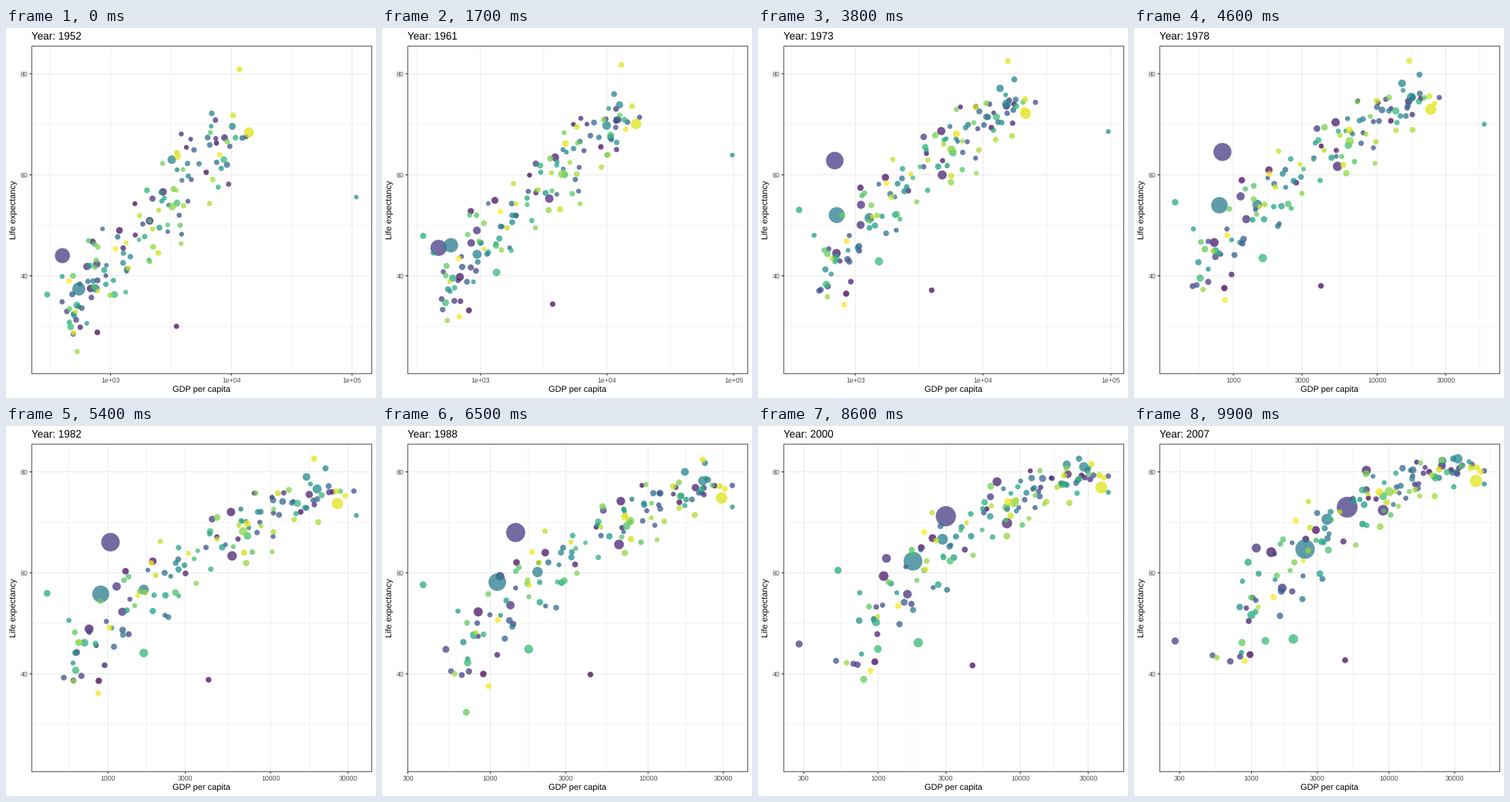
A matplotlib script for the animation above (10000 ms loop, 480 px wide and 480 px high).

```python
import numpy as np
import matplotlib.pyplot as plt
from matplotlib.animation import FuncAnimation
from matplotlib.collections import LineCollection
from matplotlib.patches import Rectangle

plt.rcParams["font.family"] = "Liberation Sans"
plt.rcParams["text.hinting"] = "none"

FRAMES, COUNT = 100, 142
LEFT, RIGHT, TOP, BOTTOM = 33.3, 474.5, 23.1, 448.2
STEPS = np.arange(12)            # one step every five years, 1952 to 2007
PART = STEPS / 11

# large or unusual countries: rank, population in millions, GDP and life
# expectancy, each as first, last (and how the path between them bends)
LEADS = [
    (24, 556, 1319, 400, 4959, 1.6, 44, 73, 0.45),
    (58, 372, 1110, 547, 2452, 1.8, 37.4, 64.7, 0.65),
    (134, 157, 301, 13990, 42952, 1, 68.4, 78.2, 1),
    (66, 86, 127, 3217, 31656, 0.4, 63, 82.6, 0.6),
    (59, 82, 223, 750, 3541, 1.1, 37.5, 70.6, 0.9),
    (14, 57, 190, 2109, 9066, 0.6, 50.9, 72.4, 0.9),
    (8, 47, 150, 684, 1391, 3, 37.5, 64.1, 1.4),
    (94, 33, 135, 1077, 2014, 0.6, 36.3, 46.9, 0.5),
    (3, 4, 12, 3520, 4797, 1, 30, 42.7, 0.6),
    (0, 8, 32, 779, 975, 1, 28.8, 43.8, 0.7),
]
GIANT, RICHEST, POOR_A, POOR_B, CRISIS = 24, 71, 87, 27, 107


def bend(a, b, power):
    return a + (b - a) * PART ** power


def path(steps, values):
    return np.interp(STEPS, steps, values)


def radius(pop):
    size = 2 + 10 * np.sqrt(np.clip((pop - 0.06) / 1318.6, 0, 1))
    return 0.375 * (size * 2.845 + 0.945) + 0.35


def crowd(rng):
    """Countries spread evenly over wealth u, with life following wealth."""
    u = rng.permutation(np.linspace(0, 1, COUNT))[:, None]

    def noise(sd):
        return sd * rng.normal(size=(COUNT, 1)).clip(-2, 2)

    sway = np.sin(np.pi * PART)
    x = bend(2.58 + 1.45 * u + noise(0.08),
             2.72 + 1.9 * u ** 0.8 + noise(0.09), 0.75)
    x += noise(0.07) * sway + rng.normal(0, 0.02, x.shape)
    lean = noise(1)
    y = bend(34 + 35 * u ** 1.15 + 4 * lean + noise(2.5),
             80 - 33 * (1 - u) ** 2.2 + (1.2 + 4 * (1 - u)) * (0.7 * lean + noise(0.7)),
             0.7)
    y += noise(1) * sway
    pop = np.exp(rng.normal(1.6, 1.15, (COUNT, 1))).clip(0.1, 50)
    return x, y, radius(pop * bend(1, 2.2, 1))


def build():
    """Log GDP, life expectancy and dot radius, each as (country, step)."""
    x, y, r = crowd(np.random.default_rng(52))
    for i, p0, p1, g0, g1, gb, l0, l1, lb in LEADS:
        x[i] = bend(np.log10(g0), np.log10(g1), gb)
        y[i] = bend(l0, l1, lb)
        r[i] = radius(bend(p0, p1, 1))
    y[GIANT, 2] = 44.5

    # the richest and poorest dots set the edges of the view
    x[RICHEST] = path([0, 1, 3, 4, 5, 6, 8, 11], np.log10(
        [108382, 113523, 80895, 109348, 59265, 33693, 34500, 49357]))
    y[RICHEST] = bend(55.6, 77.6, 0.55)
    r[RICHEST] = radius(bend(0.2, 2.5, 1))
    x = x.clip(2.6, x[RICHEST])
    x[POOR_A] = path([0, 2, 4, 6, 8, 9, 11],
                     np.log10([299, 355, 357, 424, 347, 415, 944]))
    y[POOR_A] = bend(36.3, 62.1, 0.45)
    x[POOR_B] = path([0, 4, 8, 10, 11], np.log10([781, 905, 458, 241, 278]))
    y[POOR_B] = bend(39.1, 46.5, 0.6)

    x[CRISIS] = bend(2.69, 2.93, 1)
    y[CRISIS] = path([0, 6, 8, 9, 11], [40, 46.2, 23.6, 36.1, 46.2])
    r[[POOR_A, POOR_B, CRISIS]] = radius(bend(12, 40, 1))
    return x, y.clip(23.6, 82.6), r


def tween(rows):
    t = np.linspace(0, 11, FRAMES)
    return np.array([np.interp(t, STEPS, row) for row in rows]).T


def y_px(life):
    return 59.5 + (80 - life) * 6.55


def x_breaks(lo, hi):
    """Major and minor log breaks in view, and the major labels."""
    inside = lambda b: [v for v in b if lo <= v <= hi]
    major = inside([2, 3, 4, 5])
    if len(major) >= 3:
        labels = [f"{10 ** v:.0e}" for v in major]
    else:
        log3 = np.log10(3)
        major = inside([2 + log3, 3, 3 + log3, 4, 4 + log3])
        labels = [f"{10 ** v:.0f}" for v in major]
    gap = major[1] - major[0]
    ext = np.array([major[0] - gap, *major, major[-1] + gap])
    return major, inside((ext[1:] + ext[:-1]) / 2), labels


X, Y, R = map(tween, build())

fig = plt.figure(figsize=(480 / 72, 480 / 72), dpi=72, facecolor="white")
ax = fig.add_axes([0, 0, 1, 1])
ax.set_xlim(0, 480)
ax.set_ylim(480, 0)
ax.axis("off")


def lines(color, width, z):
    coll = LineCollection([], colors=color, linewidths=width, zorder=z)
    coll.set_snap(False)
    return ax.add_collection(coll, autolim=False)


def text(x, y, s, size, color="black", ha="center", **kw):
    return ax.text(x, y, s, fontsize=size, color=color, ha=ha, va="baseline", **kw)


minor_grid = lines("#EBEBEB", 0.55, 1)
major_grid = lines("#EBEBEB", 1.07, 1.1)
ticks = lines("#333333", 1.07, 4)
dots = ax.scatter(X[0], Y[0], c=plt.get_cmap("viridis")(np.linspace(0, 1, COUNT)),
                  alpha=0.75, linewidths=0, zorder=2)
ax.add_patch(Rectangle((33.5, 23.5), 441, 425, fill=False, ec="#5A5A5A",
                       lw=1, zorder=3, snap=False))

title = text(33, 15, "", 13.5, ha="left")
text((LEFT + RIGHT) / 2, 472.8, "GDP per capita", 11)
text(13.7, (TOP + BOTTOM) / 2, "Life expectancy", 11, rotation=90,
     rotation_mode="anchor")
for v in (40, 60, 80):
    text(28.4, y_px(v) + 3.1, str(v), 8.8, "#4D4D4D", "right")
x_labels = [text(0, 460, "", 8.8, "#4D4D4D") for _ in range(5)]


def vert(xs, a, b):
    return [[(x, a), (x, b)] for x in xs]


def horiz(values, a, b):
    return [[(a, y_px(v)), (b, y_px(v))] for v in values]


def draw(i):
    lo, hi = X[i].min(), X[i].max()
    pad = 0.05 * (hi - lo)
    lo, hi = lo - pad, hi + pad

    def x_px(v):
        return LEFT + (np.asarray(v) - lo) / (hi - lo) * (RIGHT - LEFT)

    major, minor, names = x_breaks(lo, hi)
    xs = x_px(major)
    minor_grid.set_segments(vert(x_px(minor), TOP, BOTTOM)
                            + horiz((30, 50, 70), LEFT, RIGHT))
    major_grid.set_segments(vert(xs, TOP, BOTTOM)
                            + horiz((40, 60, 80), LEFT, RIGHT))
    ticks.set_segments(vert(xs, BOTTOM, BOTTOM + 2.75)
                       + horiz((40, 60, 80), LEFT - 2.75, LEFT))
    for k, label in enumerate(x_labels):
        label.set_visible(k < len(xs))
        if k < len(xs):
            label.set_x(xs[k])
            label.set_text(names[k])

    dots.set_offsets(np.column_stack([x_px(X[i]), y_px(Y[i])]))
    dots.set_sizes((2 * R[i]) ** 2)
    title.set_text(f"Year: {round(1952 + 55 * i / (FRAMES - 1))}")


anim = FuncAnimation(fig, draw, frames=FRAMES, interval=100, repeat=True,
                     repeat_delay=0, init_func=lambda: draw(0))
plt.show()
```
